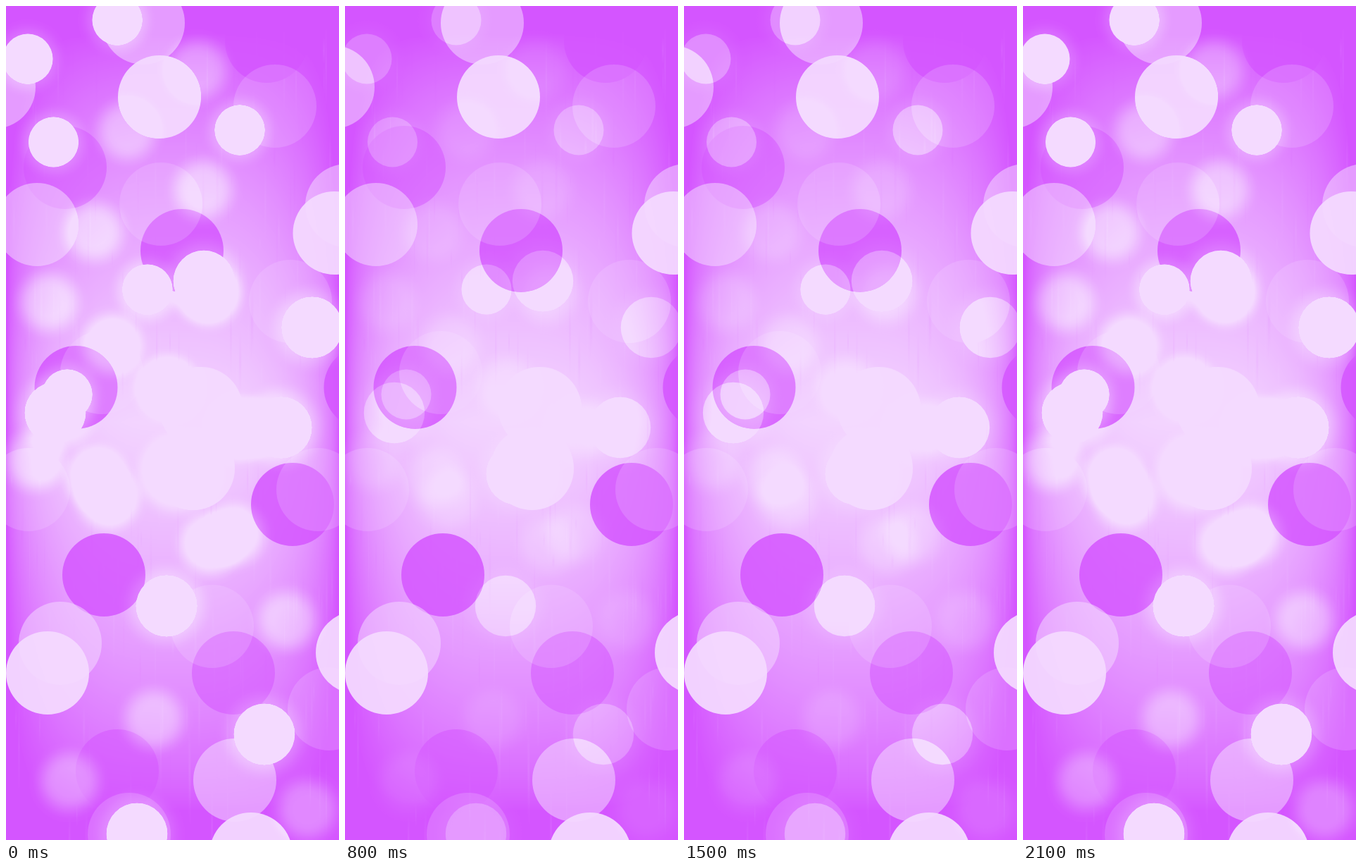
An HTML page with a canvas for the animation above (2.2 s loop, 473 by 1183 pixels).

```html
<!DOCTYPE html>
<html lang="en">
<head>
<meta charset="utf-8">
<title>Bokeh lights</title>
<style>
  html, body { margin: 0; width: 100%; height: 100%; overflow: hidden; background: #d455ff; }
  canvas { display: block; }
</style>
</head>
<body>
<canvas id="stage" width="473" height="1183"></canvas>
<script>
const W = 473, H = 1183, STEP_MS = 100, HALF = 11;
const DARK = 'rgb(212,85,255)';
const TONE_RANGE = 'rgb(32,133,0)'; // palest colour minus DARK
const stage = document.getElementById('stage').getContext('2d');
const base = new OffscreenCanvas(W, H).getContext('2d');

let seed = 7;
const random = () => (seed = seed * 16807 % 2147483647) / 2147483647;
const white = a => `rgba(255,255,255,${a})`;
const black = a => `rgba(0,0,0,${a})`;

function disc(ctx, x, y, r, fill) {
  ctx.fillStyle = fill;
  ctx.beginPath();
  ctx.arc(x, y, r, 0, Math.PI * 2);
  ctx.fill();
}

// Flat core, then a smooth falloff to the rim.
function softDisc(ctx, x, y, r, alpha, core) {
  const g = ctx.createRadialGradient(x, y, 0, x, y, r);
  for (let i = 0; i <= 6; i++) {
    const u = i / 6;
    g.addColorStop(core + (1 - core) * u, white(alpha * (1 + Math.cos(Math.PI * u)) / 2));
  }
  disc(ctx, x, y, r, g);
}

// Brightness 0..1 of the backdrop: a pale centre with dark borders.
function backdrop(x, y) {
  const h = Math.min(1, Math.abs(x / W * 2 - 1));
  const v = Math.min(1, Math.abs(y - 590) / 560);
  const tone = .98 * (1 - v) ** .62 * (1 - h ** 3) ** (.5 + .8 * v * v);
  return Math.max(0, tone * 1.06 - .08);
}

function drawBackdrop() {
  const image = base.createImageData(W, H);
  for (let i = 0; i < W * H; i++) {
    image.data.fill(255 * backdrop(i % W, Math.floor(i / W)), i * 4, i * 4 + 3);
    image.data[i * 4 + 3] = 255;
  }
  base.putImageData(image, 0, 0);
}

function drawStreaks(count) {
  for (let i = 0; i < count; i++) {
    const x = random() * W, y = random() * H, length = 20 + random() * 120;
    const tone = i % 2 ? white : black;
    const g = base.createLinearGradient(0, y, 0, y + length);
    g.addColorStop(0, tone(0));
    g.addColorStop(.5, tone(.07));
    g.addColorStop(1, tone(0));
    base.fillStyle = g;
    base.fillRect(x, y, 1 + random() * 2, length);
  }
}

// Still discs share one radius; each layer has a tone, drawn back to front.
const layers = [
  { fill: black(.55), at: [[84, 229], [158, 1085], [323, 946]] },
  { fill: black(.85), at: [[370, 50], [250, 347], [99.5, 541], [510.5, 541], [407, 707], [139, 807]] },
  { fill: white(.2), at: [[382, 142], [220, 281], [404, 419], [136, 520], [32, 686], [443, 686],
    [293, 880], [459, 997], [175, 1175]] },
  { fill: white(.52), at: [[195, 24], [-17, 115], [44, 310], [484, 283], [77, 904], [325, 1098]] },
  { fill: white(.93), at: [[218, 129], [466.5, 322], [277, 571], [266, 656], [59, 946], [499, 917], [348, 1203]] }
];

// Pulsing lights: crisp ones in two sizes, and blurred ones.
const crisp = [
  { r: 35.5, at: [[158, 20], [31, 75], [67.5, 193], [332, 176], [201, 402], [87, 551]] },
  { r: 43.2, at: [[281, 390], [435, 456], [391, 598], [70, 577], [244, 664], [228, 851], [367, 1033], [186, 1174]] }
];
const blurred = [
  [272, 90], [172, 177], [280, 260], [125, 320], [60, 420], [150, 480], [290, 410], [230, 540], [335, 600],
  [128, 670], [145, 700], [290, 765], [325, 750], [40, 645], [400, 872], [210, 1012], [90, 1101], [428, 1140]
];

function drawLights() {
  for (const [x, y] of blurred) softDisc(stage, x, y, 58, .38, .35);
  for (const { r, at } of crisp) {
    for (const [x, y] of at) {
      softDisc(stage, x, y, r * 1.6, .22, .5);
      disc(stage, x, y, r, white(.9));
    }
  }
}

function fillWith(mode, color) {
  stage.globalCompositeOperation = mode;
  stage.fillStyle = color;
  stage.fillRect(0, 0, W, H);
}

// Lights add up in greyscale, clip at white, then grey maps to the two-colour scale.
function render(power) {
  stage.globalAlpha = 1;
  stage.globalCompositeOperation = 'copy';
  stage.drawImage(base.canvas, 0, 0);
  stage.globalCompositeOperation = 'lighter';
  stage.globalAlpha = power;
  drawLights();
  stage.globalAlpha = 1;
  fillWith('multiply', TONE_RANGE);
  fillWith('lighter', DARK);
}

drawBackdrop();
drawStreaks(300);
for (const { fill, at } of layers) {
  for (const [x, y] of at) disc(base, x, y, 59, fill);
}

let shown = -1;
function tick() {
  const step = Math.floor(performance.now() / STEP_MS) % (HALF * 2);
  if (step !== shown) {
    render(Math.abs(HALF - step) / HALF);
    shown = step;
  }
  requestAnimationFrame(tick);
}
tick();
</script>
</body>
</html>
```
